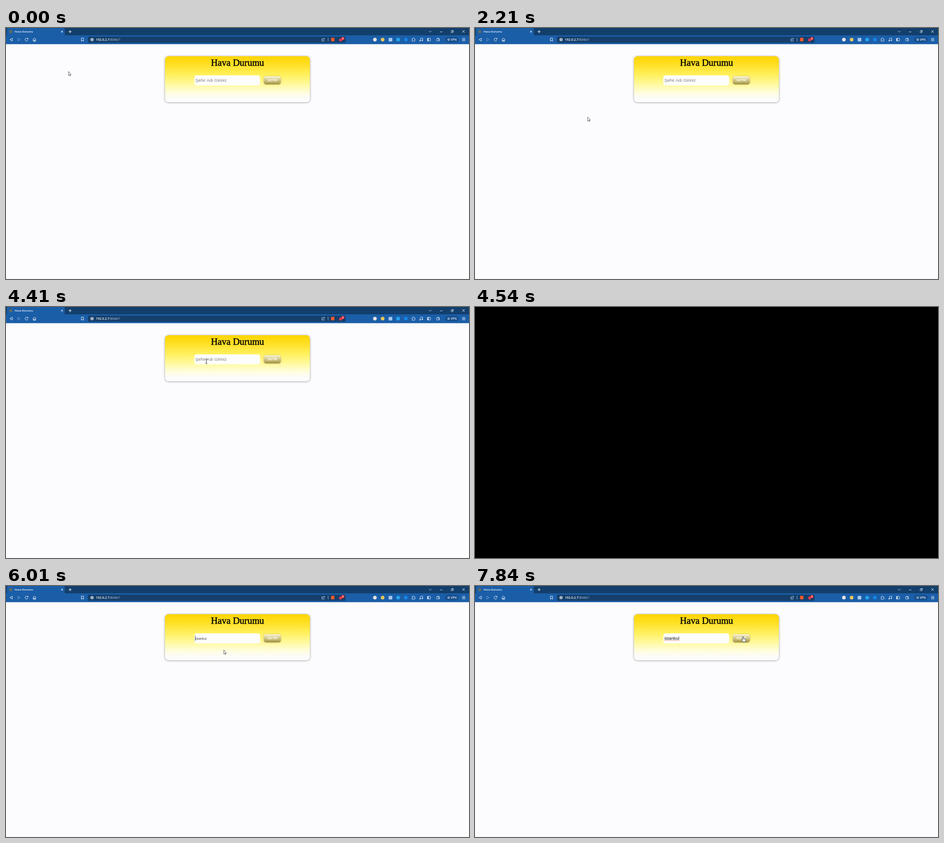
Write an HTML page with a canvas that moves like this. It is 1017 px wide and 551 px high and loops after 8 s.

```html
<!DOCTYPE html>
<html lang="tr">
<head>
<meta charset="utf-8">
<title>Hava Durumu</title>
<style>
html, body { margin: 0; width: 100%; height: 100%; overflow: hidden; background: #fcfcfe; }
canvas { display: block; width: 1017px; height: 551px; }
</style>
</head>
<body>
<canvas id="stage"></canvas>
<script>
const W = 1017, H = 551, LOOP = 8000;
const canvas = document.getElementById('stage');
const ratio = window.devicePixelRatio || 1;
canvas.width = Math.round(W * ratio);
canvas.height = Math.round(H * ratio);
const ctx = canvas.getContext('2d');

const UI = '"Open Sans", "Noto Sans", sans-serif';
const ARIAL = '"Liberation Sans", Arial, sans-serif';
const SERIF = '"Liberation Serif", "Times New Roman", serif';
const ICON = '#dce8f6';

// Pointer path: time, x, y
const PATH = [
  [0, 137, 95], [40, 137, 95], [400, 149, 148], [840, 168, 194], [1300, 168, 194],
  [1800, 184, 199], [2070, 213, 197], [2210, 247, 195], [2500, 340, 163],
  [2910, 438, 118], [2940, 438.5, 117], [3370, 438.5, 117], [3580, 408, 165],
  [3800, 374, 223], [3960, 380, 216], [4170, 418, 148], [4330, 440, 119],
  [5040, 440, 119], [5500, 464, 132], [5840, 478, 140], [6480, 478, 140],
  [6850, 506, 144], [7150, 552, 133], [7280, 574, 122], [7450, 586, 118],
  [7840, 588.5, 110.5], [8000, 588.5, 110.5]
];

function slope(i, k) {
  const a = PATH[i - 1], b = PATH[i], c = PATH[i + 1];
  if (!a || !c) return 0;
  const before = (b[k] - a[k]) / (b[0] - a[0]);
  const after = (c[k] - b[k]) / (c[0] - b[0]);
  return before * after <= 0 ? 0 : 2 * before * after / (before + after);
}

function pointerAt(t) {
  let i = 0;
  while (i < PATH.length - 2 && t >= PATH[i + 1][0]) i++;
  const a = PATH[i], b = PATH[i + 1], span = b[0] - a[0];
  const u = (t - a[0]) / span, v = u * u * (3 - 2 * u);
  return [1, 2].map(k => a[k] + (b[k] - a[k]) * v +
    span * (slope(i, k) * u * (1 - u) * (1 - u) - slope(i + 1, k) * u * u * (1 - u)));
}

function rect(x, y, w, h, fill) {
  ctx.fillStyle = fill;
  ctx.fillRect(x, y, w, h);
}

function round(x, y, w, h, r, fill) {
  ctx.beginPath();
  ctx.roundRect(x, y, w, h, r);
  ctx.fillStyle = fill;
  ctx.fill();
}

function disc(x, y, r, fill) {
  ctx.beginPath();
  ctx.arc(x, y, r, 0, 7);
  ctx.fillStyle = fill;
  ctx.fill();
}

function line(d, color = ICON, width = 0.9) {
  ctx.strokeStyle = color;
  ctx.lineWidth = width;
  ctx.stroke(new Path2D(d));
}

function text(s, x, y, font, fill, align = 'left') {
  ctx.font = font;
  ctx.fillStyle = fill;
  ctx.textAlign = align;
  ctx.fillText(s, x, y);
}

function fade(y0, y1, stops) {
  const g = ctx.createLinearGradient(0, y0, 0, y1);
  stops.forEach(([p, c]) => g.addColorStop(p, c));
  return g;
}

function drawTabs() {
  rect(0, 0, W, 16, '#123f6c');
  round(2, 0, 127, 17, [3, 3, 0, 0], '#1b5ea8');
  disc(10.5, 8, 3.6, '#5d6a62');
  text('Hava Durumu', 19, 10.2, '600 6px ' + UI, '#fff');
  line('M121.2 6.2l3.6 3.6m0-3.6l-3.6 3.6', '#fff', 1);
  line('M137.5 8h6.6m-3.3-3.3v6.6', '#fff', 1.1);
  line('M929 6.5l2.8 2.8l2.8-2.8');
  line('M953.2 8.5h5.4');
  line('M977.8 6.8h3.6v3.6h-3.6zM979 6.6v-1.2h3.6v3.8h-1.2', ICON, 0.8);
  line('M1002.2 5l5.4 5.4m0-5.4l-5.4 5.4', '#fff');
}

function drawToolbar() {
  rect(0, 16, W, 19.5, '#1b5ea8');
  line('M14 22.3v6.4l-5.4-3.2z', '#fff');
  line('M26 22.3v6.4l5.4-3.2z', '#86acd6', 0.8);
  line('M47.9 23.8a3.2 3.2 0 1 0 .3 2.8M48.4 21.8v2.4h-2.4', '#fff');
  line('M59 25.2l3.5-3l3.5 3M59.8 24.8v4.2h5.4v-4.2M61.6 29v-2.2h1.8v2.2', '#fff');
  line('M165.7 22.2h4.6v6.8l-2.3-1.9l-2.3 1.9z', '#fff');

  round(180, 19, 566, 13.5, 3, '#153f6b');
  disc(189, 25.5, 3.5, '#b6c4d3');
  rect(188.6, 25, 0.9, 2.6, '#274c73');
  rect(188.6, 23.2, 0.9, 1, '#274c73');
  const host = '192.0.2.7';
  text(host, 197.5, 28, '600 7px ' + UI, '#fff');
  text(':8046/?', 197.5 + ctx.measureText(host).width, 28, '7px ' + UI, '#b9cadb');
  line('M696 23.6h-2.2v5h5.4v-2M695.8 26.6c.2-2.4 1.6-3.2 4.2-3.2m-1.6-1.8l1.8 1.8l-1.8 1.8', ICON, 0.8);
  rect(707, 21.5, 0.9, 8, '#a8bed4');
  round(714, 21.5, 7.4, 7.8, 1, '#f1592f');
  disc(735, 26.3, 3.4, '#d93a52');
  round(736.4, 20, 7, 6.6, 2, '#e12f38');
  text('8', 739.9, 25.2, '600 5px ' + UI, '#fff', 'center');

  disc(810.3, 25.5, 4, '#e6e3e1');
  disc(827.3, 25.5, 4, '#e8c65a');
  round(840.5, 21.7, 8, 7.8, 1, '#a9c8ee');
  disc(861.3, 25.5, 4.1, '#22a5ef');
  disc(878.3, 25.5, 3.9, '#1585e6');
  line('M892 23.4h1.8c-.6-2.2 2.6-2.2 2 0h2v2c2-.6 2 2.2 0 1.8v1.8h-5.8v-1.9c1.8.3 1.8-2 0-1.7z');
  line('M910.4 28v-5.2l4.8-.8v5.2');
  disc(909.7, 28, 1.4, ICON);
  disc(914.3, 27.2, 1.4, ICON);
  line('M925.7 22.7h6.6v5.8h-6.6z');
  rect(926, 23, 2.3, 5.4, ICON);
  line('M946 23.5h6v5h-6zM946.2 23.2l4.8-1v1.2M950 25.4h2.2v1.4h-2.2z', ICON, 0.8);
  round(964.5, 19.6, 30, 12, 6, '#164e8d');
  disc(972.3, 25.5, 2.5, '#bed0e4');
  disc(972.3, 25.5, 1.2, '#164e8d');
  text('VPN', 977, 28, '600 6.4px ' + UI, '#eaf2fb');
  line('M1001.8 23h7M1001.8 25.5h7M1001.8 28h7', '#fff');
}

function drawCard() {
  ctx.save();
  ctx.shadowColor = 'rgba(0,0,0,.42)';
  ctx.shadowBlur = 4 * ratio;
  ctx.shadowOffsetY = 0.6 * ratio;
  round(349.3, 62, 318.2, 101, 8, fade(62, 163, [
    [0, '#fdd500'], [0.2, '#ffe129'], [0.4, '#fff05c'], [0.6, '#fff99a'],
    [0.8, '#fffde0'], [0.92, '#fcfcfc'], [1, '#fcfcfe']
  ]));
  ctx.restore();

  const font = '20.5px ' + SERIF;
  text('Hava Durumu', 508.5, 83, font, '#080808', 'center');
  ctx.strokeStyle = '#080808';
  ctx.lineWidth = 0.55;
  ctx.strokeText('Hava Durumu', 508.5, 83);

  round(413.7, 104, 144.4, 22, 5, '#fdfdfd');
  ctx.save();
  ctx.shadowColor = 'rgba(190,165,70,.55)';
  ctx.shadowBlur = 4 * ratio;
  round(566.3, 106, 37.5, 18, 5, fade(106, 124, [
    [0, '#fbf8e4'], [0.25, '#e3dbaa'], [0.65, '#c5b870'], [1, '#9f9144']
  ]));
  ctx.restore();
  text('GETİR', 585, 117.2, 'bold 7.06px ' + ARIAL, '#fdfdf4', 'center');
}

function drawField(t) {
  const blurred = t >= 7700;
  if (t < 5840) {
    text('Şehir Adı Giriniz', 416, 118, '9.53px ' + ARIAL, '#7b7b7b');
  } else if (t < 6200) {
    text('istanbul', 416, 117.5, '6.6px ' + UI, '#222');
  } else {
    text('istanbul', 416, 118, '9.53px ' + ARIAL, '#111');
  }
  if (blurred) {
    ctx.setLineDash([1, 0.7]);
    line('M416 119.6h33', '#e0403c', 0.9);
    ctx.setLineDash([]);
  }
  const picked = t >= 6200;
  const focus = picked ? 6200 : t >= 5570 ? 5570 : 4570;
  const lit = (picked || focus === 4570) ? (t - focus) % 1000 < 500 : true;
  if (t >= 4570 && !blurred && lit) rect(picked ? 449 : 415.6, 109, 0.8, 11, '#111');
}

function shape(d, width) {
  const p = new Path2D(d);
  ctx.fillStyle = '#fff';
  ctx.fill(p);
  ctx.strokeStyle = '#1c1c1c';
  ctx.lineWidth = width;
  ctx.lineJoin = 'round';
  ctx.stroke(p);
}

function drawPointer(t) {
  const [x, y] = pointerAt(t);
  const inside = (l, top, r, b) => x > l && x < r && y > top && y < b;
  ctx.save();
  ctx.translate(x, y);
  if (inside(414, 104, 558, 126)) {
    line('M-2.2-4.8h1.6l.6.5l.6-.5h1.6M0-4.5v9M-2.2 4.8h1.6l.6-.5l.6.5h1.6', '#111', 0.9);
  } else if (inside(566, 106, 604, 124)) {
    shape('M-1 1.2C-1-.2 1-.2 1 1.2V4.6C1.6 4 2.8 4.2 2.9 5C3.6 4.5 4.6 4.7 4.7 5.5' +
      'C5.5 5 6.2 5.5 6.2 6.3V8.7C6.2 10 5.3 10.6 5.3 12.4H0C0 11-1.8 9.4-2.6 7.4C-2.8 6.5-1.8 6.2-1 7.2Z', 0.8);
    line('M1 4.6v2.4M2.9 5v2.2M4.7 5.5v1.8', '#1c1c1c', 0.5);
  } else {
    shape('M.4.5V9.3L2.4 7.5L3.7 10.4L5 9.8L3.7 7H6.2Z', 0.7);
  }
  ctx.restore();
}

function draw(t) {
  ctx.setTransform(ratio, 0, 0, ratio, 0, 0);
  if (t >= 4540 && t < 4570) {
    rect(0, 0, W, H, '#000');
    return;
  }
  rect(0, 0, W, H, '#fcfcfe');
  rect(0, 550, W, 1, '#f3f3f5');
  drawTabs();
  drawToolbar();
  drawCard();
  drawField(t);
  drawPointer(t);
}

const start = performance.now();
function tick() {
  draw((performance.now() - start) % LOOP);
  requestAnimationFrame(tick);
}
tick();
</script>
</body>
</html>
```
